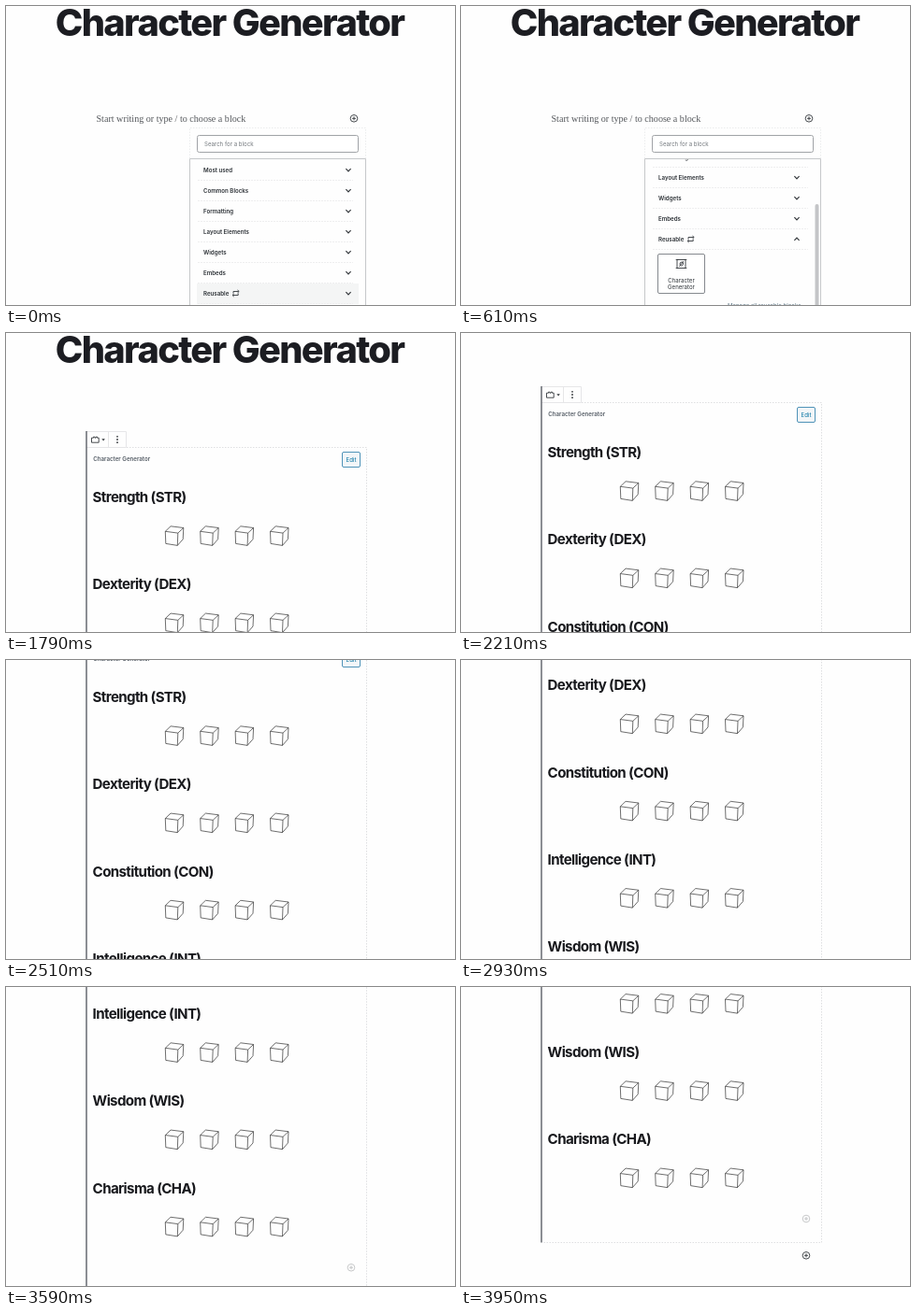
An HTML page for the animation above (4010 ms loop, 480x320 px).

```html
<!DOCTYPE html>
<html lang="en">
<head>
<meta charset="utf-8">
<title>Character Generator</title>
<style>
html, body { margin: 0; width: 100%; height: 100%; overflow: hidden; background: #fefefe; }
svg { display: block; width: 480px; height: 320px; }
text { font-family: Inter, "Open Sans", sans-serif; font-size: 6.1px; fill: #2c3136; }
.title { font-size: 39.8px; font-weight: 800; letter-spacing: -.0416em; fill: #1c1d22; }
.stat { font-size: 15.1px; font-weight: 700; letter-spacing: -.0416em; fill: #18191d; }
.prompt { font-family: "Liberation Serif", "Noto Serif", serif; font-size: 10.1px; fill: #55585c; }
.row { font-size: 6.15px; font-weight: 600; }
.mid { text-anchor: middle; }
.line { fill: none; stroke: #33373b; stroke-width: .9; }
.cube { stroke: #303030; stroke-width: .7; stroke-linejoin: round; }
.faint { fill: none; stroke: #e6e6e8; }
.rule { stroke: #eeeeef; stroke-dasharray: 2 1; }
.dash { fill: none; stroke: #dedfe1; stroke-dasharray: 1.5 1.5; }
</style>
</head>
<body>
<svg viewBox="0 0 480 320">
  <defs>
    <clipPath id="listClip"><rect x="196" y="163" width="189" height="157"/></clipPath>
    <g id="plus" class="line"><circle r="3.8"/><path d="M-2 0H2M0-2V2"/></g>
    <path id="cube" class="line cube" d="M.3 5.8L13.8 7.6L13.3 20.9L.8 18.9ZM.3 5.8L6 .3L19.8 2L13.8 7.6M19.8 2L19.2 14.2L13.3 20.9"/>
    <path id="chevron" class="line" d="M-2.6-1.3L0 1.3L2.6-1.3" style="stroke-width:1.2"/>
  </defs>

  <g id="top">
    <text class="title" x="52.8" y="32">Character Generator</text>
  </g>

  <g id="inserter">
    <text class="prompt" x="96.5" y="124">Start writing or type / to choose a block</text>
    <use href="#plus" x="372" y="120.3"/>
    <path class="dash" stroke-opacity=".6" d="M196.5 163V130.5H384.5V163"/>
    <rect x="204.5" y="138.5" width="172" height="18" rx="2" fill="#fff" stroke="#a0a3a7"/>
    <text x="212" y="149.8" style="fill:#72777c">Search for a block</text>
    <g clip-path="url(#listClip)">
      <g id="list"></g>
      <rect id="thumb" x="378.5" width="4" height="130" rx="2" fill="#c4c5c7"/>
    </g>
    <path d="M196.5 320V163.5H384.5V320" fill="none" stroke="#c6c8ca"/>
  </g>

  <g id="block">
    <path class="faint" d="M86 57.5H128.5V74.5H86M109.5 57.5V74"/>
    <path class="line" d="M91.5 64.2h2v-1h1.4v1h1.2v-1h1.4v1h1.7v5h-7.7z"/>
    <path d="M102.4 65.2h3.4l-1.7 2.2z" fill="#33373b"/>
    <g fill="#33373b"><circle cx="119" cy="62.8" r=".9"/><circle cx="119" cy="66" r=".9"/><circle cx="119" cy="69.2" r=".9"/></g>
    <path class="dash" d="M129 74.5H385.5V704.5H87"/>
    <path d="M86 57V704.5" stroke="#5b5e66" stroke-width="1.4"/>
    <text class="row" x="93.3" y="89.3" style="fill:#555d66">Character Generator</text>
    <rect x="359.5" y="79.5" width="19" height="16" rx="1.5" fill="#f3f6f8" stroke="#4f93b8"/>
    <text class="mid" x="369" y="89.8" style="fill:#0071a1">Edit</text>
    <g id="stats"></g>
    <use href="#plus" x="369" y="679" opacity=".3"/>
    <use href="#plus" x="369" y="718.3"/>
  </g>
</svg>

<script>
const LOOP = 4010, OPEN = 60, OPENED = 550, INSERT = 1790, PANEL_SCROLL = 58;
const START = -48;   // page offset before the block is scrolled
const pageKeys = [[1910, START], [2210, 0], [2510, 88], [2930, 194], [3290, 302.5], [3950, 431]];
const $ = id => document.getElementById(id);
const moveY = (id, y) => $(id).setAttribute('transform', `translate(0 ${y})`);
const show = (id, on) => $(id).setAttribute('visibility', on ? 'visible' : 'hidden');

const sections = ['Most used', 'Common Blocks', 'Formatting', 'Layout Elements', 'Widgets', 'Embeds', 'Reusable'];
$('list').innerHTML = '<rect id="hover" x="204" y="297" width="173" height="22" fill="#f4f5f5"/>' +
  sections.map((name, i) => {
    const y = 175.5 + 22 * i;
    return `<path class="rule" d="M205 ${y + 11}H371"/>
      <text class="row" x="211" y="${y + 2.2}">${name}</text>
      <use class="chev" href="#chevron" y="${y}"/>`;
  }).join('') + `
  <path class="line" d="M243 307.5v-2h5.7M248.2 307.5v2h-5.7M247.5 304l1.7 1.5-1.7 1.5M243.7 308l-1.7 1.5 1.7 1.5"/>
  <g id="card">
    <rect id="cardEdge" x="210.5" y="323.5" width="50" height="42" rx="1.5" fill="#fff" stroke="#85898e"/>
    <path class="line" d="M231 329.5h9v9h-9zM229.7 329.5h2.6M238.7 329.5h2.6M229.7 338.5h2.6M238.7 338.5h2.6"/>
    <path class="line" d="M237.8 331.2l-4.4 5.6M234 334q0-2 2-2t1.5 2-2 2-1.5-2"/>
    <text class="mid" x="235.5" y="353.6">Character</text>
    <text class="mid" x="235.5" y="360.6">Generator</text>
    <text x="285" y="381" style="fill:#687f8c">Manage all reusable blocks</text>
  </g>`;

const stats = ['Strength (STR)', 'Dexterity (DEX)', 'Constitution (CON)', 'Intelligence (INT)', 'Wisdom (WIS)', 'Charisma (CHA)'];
$('stats').innerHTML = stats.map((name, i) => {
  const y = 93.25 * i;
  const cubes = [0, 1, 2, 3].map(k => `<use href="#cube" x="${170 + 37.4 * k}" y="${158.5 + y}"/>`).join('');
  return `<text class="stat" x="92.6" y="${133.1 + y}">${name}</text>${cubes}`;
}).join('');

const chevrons = document.querySelectorAll('.chev');

// Smooth curve through the keys, at rest at both ends
function follow(keys, t) {
  const last = keys.length - 1;
  if (t <= keys[0][0]) return keys[0][1];
  if (t >= keys[last][0]) return keys[last][1];
  const slope = k => k === 0 || k === last ? 0 :
    (keys[k + 1][1] - keys[k - 1][1]) / (keys[k + 1][0] - keys[k - 1][0]);
  const i = keys.findIndex(k => k[0] > t) - 1;
  const [t0, a] = keys[i], [t1, b] = keys[i + 1], d = t1 - t0, u = (t - t0) / d;
  return a + (b - a) * u * u * (3 - 2 * u) +
    d * u * (1 - u) * (slope(i) * (1 - u) - slope(i + 1) * u);
}

function draw(t) {
  const inserted = t >= INSERT, open = t >= OPEN;
  show('inserter', !inserted);
  show('block', inserted);

  const scroll = follow([[0, 0], [OPENED, PANEL_SCROLL]], t);
  moveY('list', -scroll);
  $('thumb').setAttribute('y', 164 + scroll * 48 / PANEL_SCROLL);
  $('thumb').style.display = $('card').style.display = open ? '' : 'none';
  $('hover').style.display = t < OPENED ? '' : 'none';
  $('cardEdge').style.strokeOpacity = t < OPENED ? 0 : 1;
  chevrons.forEach((c, i) => {
    c.setAttribute('x', open ? 359 : 366);
    const y = 175.5 + 22 * i, flip = open && i === 6;
    c.setAttribute('transform', flip ? `translate(0 ${2 * y}) scale(1 -1)` : '');
  });

  // The page scrolls in steps of 60 ms
  const tick = 50 + Math.floor((t - 50) / 60) * 60;
  const page = follow(pageKeys, tick);
  moveY('block', -page);
  moveY('top', START - page);
}

function frame() {
  draw(performance.now() % LOOP);
  requestAnimationFrame(frame);
}
frame();
</script>
</body>
</html>
```
